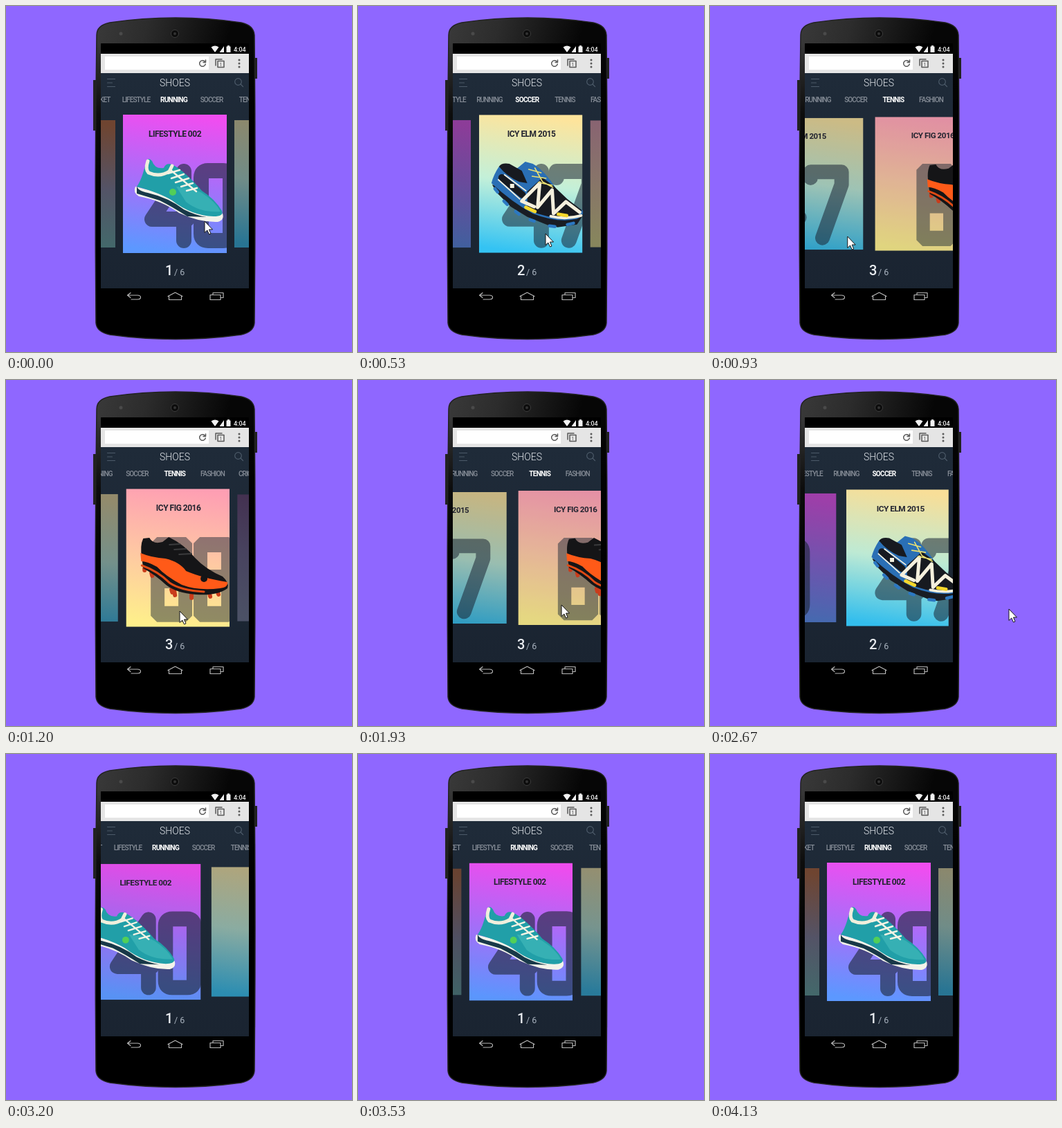
Recreate the animation shown at these times as an HTML page. Size 500 by 500 pixels, loop 4.34 s.

```html
<!DOCTYPE html>
<html lang="en">
<head>
<meta charset="utf-8">
<title>Shoe carousel</title>
<style>
html, body { margin: 0; width: 100%; height: 100%; overflow: hidden; background: #8f67ff }
svg { display: block; width: 100vw; height: 100vh; font-family: Roboto, Arial, sans-serif }
.line { fill: none; stroke-linecap: round; stroke-linejoin: round }
.digit { fill: none; stroke: #1b2636; stroke-width: 22; stroke-linecap: round; stroke-linejoin: round }
.title { font-size: 12px; font-weight: 700; letter-spacing: -.5px; fill: #232430 }
.tab { font-size: 10px; font-weight: 500; letter-spacing: -.9px; fill: #868d97 }
.tab.on { font-weight: 700; letter-spacing: -.7px; fill: #fff }
</style>
</head>
<body>
<svg viewBox="0 0 500 500">
  <defs>
    <linearGradient id="body" x2=".75" y2=".4">
      <stop stop-color="#3a3a3a"/><stop offset=".35" stop-color="#2c2c2c"/><stop offset=".9" stop-color="#060606"/>
    </linearGradient>
    <linearGradient id="shade" x2="0" y2="1">
      <stop offset=".08" stop-opacity="0"/><stop offset=".3" stop-opacity=".75"/><stop offset=".6"/>
    </linearGradient>
    <linearGradient id="app" x2="0" y2="1">
      <stop stop-color="#1f2b39"/><stop offset="1" stop-color="#1a2431"/>
    </linearGradient>
    <clipPath id="screen"><path d="M137 97h214v311h-214z"/></clipPath>
    <clipPath id="face"><path d="M-75-100h150v200h-150z"/></clipPath>
    <path id="shell" d="M131 42Q131 28 150 24Q245 10 340 24Q358 28 359 42Q361 250 359 458Q358 471 340 475Q245 488 150 475Q131 471 130 458Q128 250 131 42Z"/>
  </defs>

  <path d="M126 107h4v73h-4zM358 75h5v30h-5z" fill="#222"/>
  <use href="#shell" fill="url(#body)"/>
  <use href="#shell" fill="url(#shade)" stroke="#222" stroke-width="1.5"/>
  <circle cx="166" cy="40" r="2.5" fill="#4a4a4a"/>
  <circle cx="244" cy="40" r="5.5" fill="#0c0c0c" stroke="#3c3c3c"/>
  <circle cx="244" cy="40" r="2" fill="#333"/>
  <path d="M137 54h214v15h-214z"/>

  <g fill="#f2f2f2">
    <path d="M296.500 59.500Q302 55.500 307.500 59.500L302 67ZM308.500 67L315 58V67ZM318.500 58.500h1.500v-1.500h3v1.500h1.500V67h-6z"/>
    <text x="329" y="66" font-size="9" font-weight="500">4:04</text>
  </g>
  <path d="M137 69h214v28h-214z" fill="#e5e5e5"/>
  <path d="M143 73h150v19h-150z" fill="#fff"/>
  <g class="line" stroke="#5a5a5a" stroke-width="1.500">
    <path d="M287.500 80.500A4.300 4.300 0 1 0 288.200 84M288.500 78v3.500h-3.500M303 86v-9h9M306 79.500h9v9h-9z"/>
  </g>
  <text x="310.500" y="87" font-size="7" text-anchor="middle" fill="#5a5a5a">1</text>
  <g fill="#5a5a5a"><circle cx="337" cy="78" r="1.500"/><circle cx="337" cy="83" r="1.500"/><circle cx="337" cy="88" r="1.500"/></g>

  <path d="M137 97h214v311h-214z" fill="url(#app)"/>
  <g class="line" stroke="#4c5a69" stroke-width="1.200">
    <path d="M146.500 105.500h11M146.500 111h7M146.500 116.500h11"/>
    <circle cx="335.500" cy="109.500" r="4.800"/><path d="M339 113l3.500 3.500"/>
  </g>
  <text x="244" y="116" font-size="14" font-weight="300" text-anchor="middle" fill="#e4e8ed">SHOES</text>
  <g clip-path="url(#screen)"><g id="tabs" text-anchor="middle"></g><g id="cards"></g></g>
  <text id="count" x="230" y="389" font-size="20" font-weight="500" fill="#e8ebef"></text>
  <text x="243" y="389" font-size="12.500" fill="#a9b3bf">/ 6</text>

  <g class="line" stroke="#b8b8b8" stroke-width="1.200">
    <path d="M180 414.500l-4.500 3.500l4.500 3.500M176 418h14q4.500 0 4.500 3t-4.500 3h-9M234 419.500l10.500-5.500l10.500 5.500h-1.500v5h-18v-5zM295 417.500h15v7h-15zM299 417.500v-3h15v7h-4"/>
  </g>
  <path id="cursor" d="M0 0V16.500L3.800 13L6.500 19L9 18L6.500 12H11.500Z" fill="#fff" stroke="#141414"/>
</svg>
<script>
const LOOP = 4340, STEP = 200 / 3;
const $ = id => document.getElementById(id);

const four = 'M13-18L-33 51H18M13-18V82';
const zero = 'M48-19H70Q80-19 80-9V72Q80 82 70 82H48Q38 82 38 72V-9Q38-19 48-19Z';
const seven = 'M35-9V-18H82V1L53 82';
const eight = x => `M${x + 9}-30h42l9 9v105l-9 9h-42l-9-9v-105zm11 22v25h20v-25zm0 52v26h20v-26z`;
const digits = (d, opacity) => `<path class="digit" d="${d}" opacity="${opacity}"/>`;
const fill = (d, c) => `<path d="${d}" fill="${c}"/>`;
const line = (d, c, w) => `<path class="line" d="${d}" stroke="${c}" stroke-width="${w}"/>`;

const sneaker = `<g transform="translate(-244 -257)">
  ${fill('M187 261Q183 270 192 275Q225 281 250 299Q280 313 306 312Q316 309 313 300L260 280Z', '#f3f3ea')}
  ${fill('M189 260Q190 267 205 270Q235 277 257 294Q275 303 290 305L262 304Q240 290 222 281L189 271Z', '#183848')}
  ${fill('M204 222C199 236 197 250 189 261Q222 270 240 281Q268 303 300 304Q315 304 312 296Q302 279 283 267Q258 238 240 229Q231 226 228 234Q215 236 211 224Q207 219 204 222Z', '#219fa8')}
  ${fill('M246 261Q270 262 283 270Q303 283 310 297Q280 299 260 283Z', '#36b0b4')}
  ${line('M205 224Q201 236 206 241Q222 248 236 239L240 231', '#f0efdc', 5)}
  ${line('M234 242l17-5M239 249l18-6M245 255l19-6M253 261l17-5M261 267l15-4M239 238l36 30', '#f4f3e4', 2.4)}
  <circle cx="241" cy="269" r="5" fill="#52cf58"/></g>`;

const trail = `<g transform="translate(-256 -259)">
  ${fill('M195 260L201 271L222 292L246 307L276 319L290 322L318 318L327 304L300 294Z', '#191d24')}
  ${line('M199 266l4 5M212 284l5 5M229 299l5 4M250 311l6 2M278 320l8 1M304 318l9-2', '#2c78c2', 4.5)}
  ${fill('M205 234Q197 246 194 258Q224 286 254 302Q290 316 318 310Q329 305 326 297Q306 288 290 270Q272 240 254 230L243 227L232 236Q218 240 211 232Z', '#2a6fb5')}
  ${fill('M205 234Q209 228 220 230L238 240L246 258L234 256Q216 248 205 234ZM246 270L268 250L284 262L304 281L325 297L318 308Q280 312 246 296Z', '#171a20')}
  ${line('M209 250L239 275', '#171a20', 10)}${line('M204 253L235 281M213 246L244 269', '#f4f1e0', 1.800)}
  ${line('M238 284L264 258L261 293L282 268L284 302L302 285L322 300M238 284L256 292', '#f5f0dd', 5)}
  ${line('M280 306Q302 311 324 305', '#f5f0dd', 4)}
  ${line('M244 293l13 6M291 303l12 2', '#f6d82c', 5)}
  ${line('M248 238l18 5M253 248l20 3M262 257l20 4M257 236l11 20l15 8', '#eadf72', 1.600)}
  <path d="M221 259h6v6h-6z" fill="#f4f1e0"/></g>`;

const boot = `<g transform="translate(-252 -257)">
  ${line('M200 272l0 3M210 279l1 4M239 303l1 4M243 305l1 6M268 310l0 5M294 309l1 4M306 307l1 3', '#c93c1b', 6)}
  ${fill('M198 229Q193 239 196 258L198 272Q216 282 231 296Q246 308 274 310Q306 312 320 301Q323 293 313 284Q289 274 273 257Q258 238 235 227L226 234Q212 238 207 228Z', '#151517')}
  ${fill('M194 250Q211 257 230 258Q251 263 260 276Q283 286 320 292Q321 300 309 301Q278 305 254 296Q231 284 218 270Q204 262 195 262Z', '#ff5a18')}
  ${line('M196 268Q219 276 236 293Q252 304 286 306', '#e04a14', 3)}
  ${line('M236 238l15-1M243 245l17-1M250 252l18-1', '#3b3b3d', 2)}
  <circle cx="286" cy="287" r="5" fill="#151517"/></g>`;

const cards = [
  { at: -1, tones: ['#c0602a', '#8b7f98', '#68b0a4'] },
  { at: 0, tones: ['#f04df0', '#a66ffa', '#5c98ff'], title: 'LIFESTYLE 002', number: digits(four + zero, .6), shoe: sneaker },
  { at: 1, tones: ['#ffe59c', '#c4f1da', '#35c4f4'], title: 'ICY ELM 2015', number: digits(four + seven, .55), shoe: trail },
  { at: 2, tones: ['#ffa0b4', '#ffc9a4', '#fff08c'], title: 'ICY FIG 2016',
    number: `<path d="${eight(-41)}${eight(21)}" fill="#1b2636" fill-rule="evenodd" opacity=".48"/>`, shoe: boot },
  { at: 3, tones: ['#6b3468', '#76608c', '#7f7f9c'] }
];

$('cards').innerHTML = cards.map(({ tones, title = '', number = '', shoe = '' }, i) => `<g>
  <linearGradient id="tone${i}" x1=".55" x2=".45" y2="1">${tones.map((c, k) => `<stop offset="${k / 2}" stop-color="${c}"/>`).join('')}</linearGradient>
  <g clip-path="url(#face)"><path d="M-75-100h150v200h-150z" fill="url(#tone${i})"/><g>${number}</g></g>
  <text class="title" y="-68" text-anchor="middle">${title}</text><g>${shoe}</g></g>`).join('');
cards.forEach((c, i) => {
  c.root = $('cards').children[i];
  [, c.face, c.label, c.shoeBox] = c.root.children;
  c.numberBox = c.face.lastElementChild;
});

const names = ['RUNNING', 'SOCCER', 'TENNIS', 'FASHION', 'CRICKET', 'LIFESTYLE'];
for (let i = -2; i < 6; i++)
  $('tabs').innerHTML += `<text class="tab" x="${242.5 + 54.5 * i}" y="139">${names[(i + 6) % 6]}</text>`;

// [time, value]
const scroll = [[0, 0], [100, .08], [200, .3], [300, .62], [400, .85], [533, .966], [650, 1], [750, 1.1], [900, 1.5],
  [1050, 1.85], [1200, 1.974], [1350, 2], [1550, 1.98], [1933, 1.63], [2133, 1.28], [2667, .837], [2870, .6],
  [3200, .22], [3500, .06], [3850, .005], [4000, 0], [LOOP, 0]];
const pointerX = [[0, 287], [260, 225], [533, 271], [850, 190], [1200, 251], [1450, 249], [1933, 294], [2133, 353], [2667, 432], [3000, 481], [3130, 505]];
const pointerY = [[0, 311], [533, 329], [1200, 334], [1933, 325], [2667, 331], [3130, 336]];

// Monotone cubic through the keys
function at(keys, t) {
  const last = keys.length - 1;
  if (t >= keys[last][0]) return keys[last][1];
  const i = keys.findIndex(k => k[0] > t) - 1;
  const slope = k => k < 0 || k >= last ? 0 : (keys[k + 1][1] - keys[k][1]) / (keys[k + 1][0] - keys[k][0]);
  const tangent = k => {
    const a = slope(k - 1), b = slope(k);
    return a * b > 0 ? 2 * a * b / (a + b) : 0;
  };
  const [t0, v0] = keys[i], [t1, v1] = keys[i + 1], h = t1 - t0, u = (t - t0) / h, w = 1 - u;
  return v0 * (1 + 2 * u) * w * w + v1 * u * u * (3 - 2 * u) + h * u * w * (tangent(i) * w - tangent(i + 1) * u);
}

const move = (el, x, y = 0, s = 1) => el.setAttribute('transform', `translate(${x} ${y}) scale(${s})`);

function draw(now) {
  const t = Math.floor((now % LOOP + 5) / STEP) * STEP;
  const p = at(scroll, t), active = Math.round(p);
  for (const c of cards) {
    const d = c.at - p, far = Math.abs(d);
    move(c.root, 244 + d * (155 + 12 * Math.max(0, 1 - far)), 257, 1 - .08 * far);
    c.face.setAttribute('opacity', Math.max(0, 1 - .5 * far ** 1.5));
    move(c.numberBox, 68 * d);
    move(c.label, 28 * d);
    move(c.shoeBox, 148 * d);
  }
  move($('tabs'), -54.5 * p);
  [...$('tabs').children].forEach((tab, i) => tab.classList.toggle('on', i - 2 === active));
  $('count').textContent = active + 1;
  move($('cursor'), at(pointerX, t), at(pointerY, t));
  $('cursor').style.display = t < 3060 ? '' : 'none';
}

const start = performance.now();
(function tick() {
  draw(performance.now() - start);
  requestAnimationFrame(tick);
})();
</script>
</body>
</html>
```
